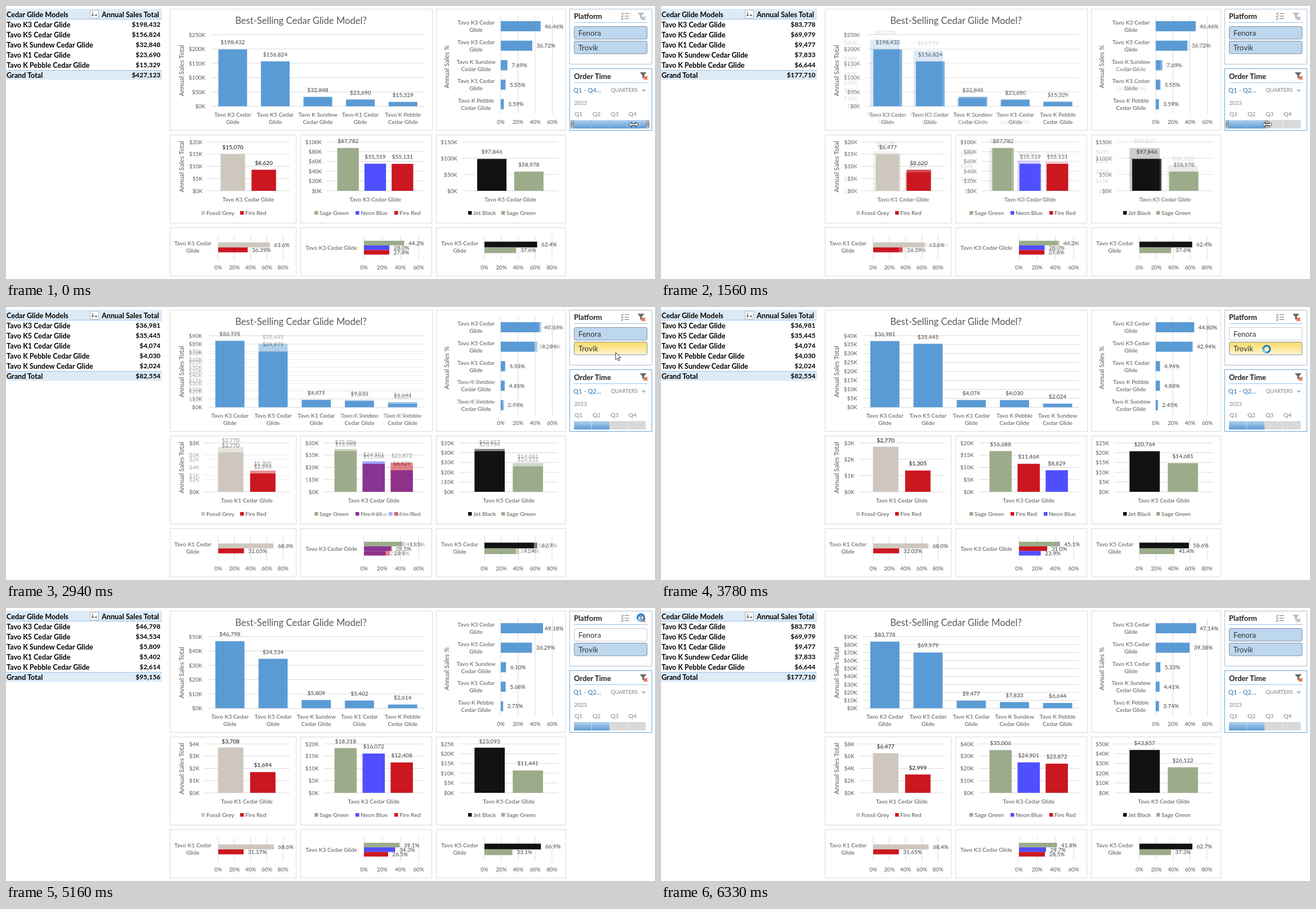
Recreate the animation shown at these times as an HTML page. Size 1153 px wide and 486 px high, loop 6.48 s.

```html
<!DOCTYPE html>
<html lang="en">
<head>
<meta charset="utf-8">
<title>Sales dashboard</title>
<style>
  html, body { margin: 0; width: 100%; height: 100%; overflow: hidden; background: #fff; }
  svg { display: block; width: 1153px; height: 486px; font-family: Lato, Carlito, sans-serif; }
</style>
</head>
<body>
<svg id="stage" viewBox="0 0 1153 486" xmlns="http://www.w3.org/2000/svg">
  <defs>
    <linearGradient id="hover" x2="0" y2="1">
      <stop offset="0" stop-color="#fbdc69"/><stop offset=".45" stop-color="#fce68f"/><stop offset="1" stop-color="#fef6d8"/>
    </linearGradient>
    <linearGradient id="span" x2="0" y2="1">
      <stop offset="0" stop-color="#b3d3ef"/><stop offset="1" stop-color="#5b9bd5"/>
    </linearGradient>
  </defs>
</svg>
<script>
const LOOP = 6480, FRAME = 30, FADE = 190;
const BLUE = '#5b9bd5', GRID = '#d9d9d9', INK = '#595959', LABEL = '#404040';
const stage = document.getElementById('stage');

// ---- drawing helpers
function add(parent, tag, attrs, content) {
  const node = document.createElementNS('http://www.w3.org/2000/svg', tag);
  for (const key in attrs) node.setAttribute(key, attrs[key]);
  if (content !== undefined) node.textContent = content;
  parent.appendChild(node);
  return node;
}
const group = parent => add(parent, 'g', {});
const box = (g, x, y, width, height, fill, more) => add(g, 'rect', { x, y, width, height, fill, ...more });
const line = (g, x1, y1, x2, y2, stroke = GRID, w = 1) =>
  add(g, 'line', { x1, y1, x2, y2, stroke, 'stroke-width': w });
const path = (g, d, fill, stroke = 'none', w = 1) =>
  add(g, 'path', { d, fill, stroke, 'stroke-width': w });
// y is the middle of the capitals
function text(g, str, x, y, size, anchor = 'start', fill = INK, weight = 400) {
  return add(g, 'text', {
    x, y: y + size * 0.36, 'font-size': size, 'text-anchor': anchor, fill, 'font-weight': weight
  }, str);
}
const panel = (g, x, y, right, bottom, stroke = GRID) =>
  box(g, x + .5, y + .5, right - x - 1, bottom - y - 1, '#fff', { stroke });
const show = (node, on) => { node.style.display = on ? '' : 'none'; };
const money = v => '$' + Math.round(v).toLocaleString('en-US');

// ---- data
const LINE = 'Cedar Glide';
const models = { 3: 'Tavo K3', 5: 'Tavo K5', 1: 'Tavo K1', S: 'Tavo K Sundew', P: 'Tavo K Pebble' };
const fullName = key => models[key] + ' ' + LINE;
const wrapped = key => models[key].length > 7 ? [models[key], LINE] : [models[key] + ' Cedar', 'Glide'];

const paint = {
  F: { name: 'Fossil Grey', fill: '#cec7be', step: 69 },
  R: { name: 'Fire Red', fill: '#cb1720', step: 59 },
  G: { name: 'Sage Green', fill: '#9cac8b', step: 73 },
  B: { name: 'Neon Blue', fill: '#4f4fff', step: 69 },
  K: { name: 'Jet Black', fill: '#111214', step: 59 }
};

// axis is [maximum, step] in thousands
const year = {
  order: '35S1P', vals: [198432, 156824, 32848, 23690, 15329], total: 427123, axis: [250, 50],
  k1: { axis: [20, 5], keys: 'FR', vals: [15070, 8620] },
  k3: { axis: [100, 20], keys: 'GBR', vals: [87782, 55519, 55131] },
  k5: { axis: [150, 50], keys: 'KG', vals: [97846, 58978] }
};
const half = {
  order: '351SP', vals: [83778, 69979, 9477, 7833, 6644], total: 177710, axis: [90, 10],
  k1: { axis: [8, 2], keys: 'FR', vals: [6477, 2999] },
  k3: { axis: [40, 10], keys: 'GBR', vals: [35006, 24901, 23872] },
  k5: { axis: [50, 10], keys: 'KG', vals: [43857, 26122] }
};
const shopA = {
  order: '351PS', vals: [36981, 35445, 4074.3, 4030, 2024], total: 82554, axis: [40, 5],
  k1: { axis: [3, 1], keys: 'FR', vals: [2770, 1305.3] },
  k3: { axis: [20, 5], keys: 'GRB', vals: [16688, 11464, 8829] },
  k5: { axis: [25, 5], keys: 'KG', vals: [20764, 14681] }
};
const shopB = {
  order: '35S1P', vals: [46798, 34534, 5809, 5402, 2614], total: 95156, axis: [50, 10],
  k1: { axis: [4, 1], keys: 'FR', vals: [3707.6, 1694.45] },
  k3: { axis: [20, 5], keys: 'GBR', vals: [18318, 16072, 12408] },
  k5: { axis: [25, 5], keys: 'KG', vals: [23093, 11441] }
};
// until: when the table moves on; fade: when the charts start to follow
const views = [
  { data: year, until: 1290, fade: 1520 },
  { data: half, until: 2640, fade: 2850 },
  { data: shopA, until: 3900, fade: 4050 },
  { data: shopB, until: 5700, fade: 5840 },
  { data: half, until: LOOP, fade: LOOP }
];

// ---- charts
function columns(g, o) {
  const [max, step] = o.axis;
  const left = o.left - 5.6 * (3 - String(max).length);
  const width = o.right - left, mid = (left + o.right) / 2, rise = o.base - o.top;
  for (let v = 0; v <= max; v += step) {
    const y = o.base - rise * v / max;
    line(g, left, y, o.right, y);
    text(g, `$${v}K`, left - o.gap, y, 9.8, 'end');
  }
  return o.vals.map((v, i) => {
    const x = mid + (i - (o.vals.length - 1) / 2) * width * o.pitch;
    const y = o.base - rise * v / max / 1000;
    box(g, x - width * o.bar / 2, y, width * o.bar, o.base - y, o.fill(i));
    if (o.names) o.names[i].forEach((s, k) => text(g, s, x, 193 + 13 * k, 10.3, 'middle'));
    const labelY = Math.max(y - 12.5, o.top - 5);
    return { mid, label: text(g, money(v), x, labelY, 10.1, 'middle', o.ink || LABEL) };
  });
}

function shares(g, o) {
  for (let v = 0; v <= o.max; v += 20) {
    const x = o.x + v * o.unit;
    line(g, x, o.top, x, o.bottom);
    text(g, v + '%', x, o.tickY, 9.8, 'middle');
  }
  o.vals.forEach((v, i) => {
    const y = o.rowY(i), end = o.x + v * o.unit;
    box(g, o.x, y - o.thick / 2, v * o.unit, o.thick, o.fill(i));
    text(g, v.toFixed(o.digits(i)) + '%', Math.min(end + 7.5, o.limit), y, 10, 'start', LABEL);
  });
}

function vertical(g, str, x, y) {
  text(g, str, 0, 0, 11.6, 'middle').setAttribute('transform', `translate(${x} ${y}) rotate(-90)`);
}

const clusters = [
  { id: 'k1', key: '1', x: 291, end: 516, left: 362.6, right: 504, gap: 8, pitch: .374, bar: .296, legend: 347,
    ink: '#111', zero: 377, unit: 1.44, max: 80, first: 425.3, row: 8.8, cat: 332 },
  { id: 'k3', key: '3', x: 523, end: 757, left: 570, right: 742, gap: 9, pitch: .281, bar: .223, legend: 548,
    zero: 636, unit: 1.617, max: 60, first: 422, row: 8.2, cat: 578 },
  { id: 'k5', key: '5', x: 764, end: 995, left: 811, right: 981, gap: 9.5, pitch: .387, bar: .306, legend: 821,
    zero: 850, unit: 1.5, max: 80, first: 424.6, row: 10.2, cat: 806 }
];

function charts(data) {
  const g = group(stage);
  let lead;
  panel(g, 291, 5, 758, 222);
  text(g, `Best-Selling ${LINE} Model?`, 524, 26, 16.6, 'middle');
  vertical(g, 'Annual Sales Total', 312, 115);
  columns(g, {
    axis: data.axis, vals: data.vals, left: 365, right: 743, top: 51, base: 178.5, gap: 11,
    pitch: .2, bar: .135, fill: () => BLUE, names: [...data.order].map(wrapped)
  });

  panel(g, 764, 5, 995, 222);
  vertical(g, 'Annual Sales %', 783, 108);
  shares(g, {
    x: 879, unit: 1.525, max: 60, top: 18, bottom: 192, tickY: 206, thick: 18, limit: 957,
    vals: data.vals.map(v => 100 * v / data.total), rowY: i => 36 + 34.7 * i, digits: () => 2, fill: () => BLUE
  });
  [...data.order].forEach((key, i) => wrapped(key).forEach((s, k) =>
    text(g, s, 835, 29.5 + 34.7 * i + 13 * k, 10.3, 'middle')));

  for (const c of clusters) {
    const { axis, keys, vals } = data[c.id];
    const fill = i => paint[keys[i]].fill;
    panel(g, c.x, 229, c.end, 387);
    const bars = columns(g, { ...c, axis, vals, fill, top: 242, base: 329 });
    text(g, fullName(c.key), bars[0].mid, 344, 10.3, 'middle');
    if (c.id === 'k1') {
      vertical(g, 'Annual Sales Total', 312, 286);
      lead = bars[0].label;
    }
    let x = c.legend;
    for (const key of keys) {
      box(g, x, 365, 6.5, 6.5, paint[key].fill);
      text(g, paint[key].name, x + 9, 368.5, 10.4);
      x += paint[key].step;
    }

    panel(g, c.x, 394, c.end, 481);
    const sum = vals.reduce((a, b) => a + b);
    shares(g, {
      x: c.zero, unit: c.unit, max: c.max, top: 408, bottom: 451, tickY: 465, thick: c.row, limit: c.end,
      vals: vals.map(v => 100 * v / sum), rowY: i => c.first + c.row * i,
      digits: i => c.id === 'k1' && i ? 2 : 1, fill
    });
    if (c.id === 'k3') text(g, fullName(c.key), c.cat, 430, 10.3, 'middle');
    else wrapped(c.key).forEach((s, k) => text(g, s, c.cat, 422 + 13.5 * k, 10.3, 'middle'));
  }
  return { g, lead };
}

function table(data) {
  const g = group(stage);
  const row = (name, value, i) => {
    text(g, name, 1, 15 + 18 * i, 12.6, 'start', '#000', 700);
    text(g, value, 274.5, 15 + 18 * i, 11.9, 'end', '#000', 700);
  };
  box(g, 0, 5, 277, 18.5, '#ddebf7');
  box(g, 0, 114, 277, 17.5, '#ddebf7');
  line(g, 0, 23.5, 277, 23.5, '#9bc2e6');
  line(g, 0, 114.5, 277, 114.5, '#9bc2e6');
  text(g, LINE + ' Models', 1, 15, 12.6, 'start', '#000', 700);
  text(g, 'Annual Sales Total', 272, 15, 12.7, 'end', '#000', 700);
  box(g, 149.5, 7.5, 15, 14, '#fdfdfd', { stroke: '#b5b5b5' });
  path(g, 'M154 10.5v7M152 15.5l2 2.2 2-2.2', 'none', '#44546a', 1.1);
  path(g, 'M157.5 15.5h5l-2.5 3z', '#555');
  data.vals.forEach((v, i) => row(fullName(data.order[i]), money(v), i + 1));
  row('Grand Total', money(data.total), 6);
  return g;
}

// the last view lies at the bottom, so each one fades to the next
for (let i = views.length - 1; i >= 0; i--) Object.assign(views[i], charts(views[i].data));
for (const v of views) v.table = table(v.data);

// ---- slicer
function filterIcon(x, y, on) {
  const g = group(stage);
  path(g, `M${x} ${y}h12l-4.5 5.5v6l-3-2v-4z`, on ? '#6a6a6a' : '#bdbdbd');
  path(g, `M${x + 7.5} ${y + 7}l6 6m0-6l-6 6`, 'none', on ? '#e2512c' : '#b0b0b0', 1.8);
  return g;
}
panel(stage, 1001, 5, 1148, 104, '#a9c0d6');
text(stage, 'Platform', 1009, 18.5, 13, 'start', '#222', 700);
for (let i = 0; i < 3; i++) {
  path(stage, `M1093 ${13.5 + 4.5 * i}l1.5 1.5 2.5-3M1099 ${13.5 + 4.5 * i}h8`, 'none', '#777', 1.1);
}
line(stage, 1009, 29.5, 1140, 29.5, '#9dc3e6');
const iconOff = filterIcon(1122, 12, false), iconOn = filterIcon(1122, 12, true);
const buttons = ['Fenora', 'Trovik'].map((name, i) => {
  const y = 36.5 + 26 * i;
  const face = box(stage, 1009.5, y, 129.5, 22.5, '#bdd7ee', { rx: 2.5 });
  text(stage, name, 1017, y + 11.3, 13.2, 'start', '#333');
  return { face, y };
});

// ---- timeline
panel(stage, 1001, 111, 1148, 222, '#6aa5d8');
text(stage, 'Order Time', 1009, 125, 13.1, 'start', '#222', 700);
filterIcon(1126, 118, true);
line(stage, 1009, 136.5, 1140, 136.5, '#9dc3e6');
const rangeLabel = text(stage, '', 1008, 150, 11.3, 'start', '#2e75b6');
text(stage, 'QUARTERS', 1074.5, 150, 9.3, 'start', '#808080');
path(stage, 'M1129 148.5h8l-4 4.5z', '#b5b5b5');
text(stage, '2023', 1009.5, 173, 9.6, 'start', '#808080');
const cells = [1009, 1041, 1073, 1105].map((x, i) => {
  text(stage, 'Q' + (i + 1), x + 1, 192, 10.4, 'start', '#808080');
  return box(stage, x, 203, 31.5, 15, GRID);
});
const grips = group(stage);
const gripBand = box(grips, 1005, 203, 0, 15, 'url(#span)');
const gripLines = [1040.5, 1072.5, 1104.5].map(x => line(grips, x, 203, x, 218, '#8dbbe5'));
function grip() {
  const g = group(grips);
  box(g, 0.5, 203.5, 5, 14, '#c4c4c4', { stroke: '#858585', rx: 2 });
  line(g, 2, 207, 2, 214, '#777');
  line(g, 4, 207, 4, 214, '#777');
  return g;
}
grip().setAttribute('transform', 'translate(1003 0)');
const endGrip = grip();

// ---- pointer
const pointer = group(stage);
const arrow = path(pointer, 'M0 0v13l3-2.8 2.1 4.6 2.1-1-2.1-4.4h4.2z', '#fff', '#333');
const resize = path(pointer, 'M-8.5 0l4.5-4.5v3h8v-3l4.5 4.5-4.5 4.5v-3h-8v3z', '#fff', '#222');
const busy = group(pointer);
add(busy, 'circle', { r: 6, fill: '#ffffff55', stroke: '#1f7fd0', 'stroke-width': 3.2 });
const glint = add(busy, 'circle', {
  r: 6, fill: 'none', stroke: '#6fc3f5', 'stroke-width': 3.2, 'stroke-dasharray': '10 27.7'
});

const moves = [
  [0, 1115, 211], [30, 1115, 211], [660, 1092, 211], [930, 1077, 211], [1710, 1077, 211], [2130, 1087, 58],
  [2430, 1087, 58], [2790, 1083, 81], [3090, 1083, 81], [3390, 1076, 75], [4530, 1076, 75],
  [5070, 1128, 17], [LOOP, 1128, 17]
];
const clamp = v => Math.min(1, Math.max(0, v));
function place(t) {
  const i = moves.findIndex(m => m[0] > t);
  const [t0, x0, y0] = moves[i - 1], [t1, x1, y1] = moves[i];
  const p = (t - t0) / (t1 - t0), e = p * p * (3 - 2 * p);
  return [x0 + (x1 - x0) * e, y0 + (y1 - y0) * e];
}
const within = (t, a, b) => t >= a && t < b;

function render(t) {
  const now = views.findIndex(v => t < v.until);
  let covered = false;
  views.forEach((v, i) => {
    const alpha = 1 - clamp((t - v.fade) / FADE);
    show(v.table, i === now);
    show(v.g, alpha > 0 && !covered);
    v.g.setAttribute('opacity', alpha);
    if (alpha === 1) covered = true;
    // this one label follows the table at once
    v.lead.textContent = money(views[Math.max(i, now)].data.k1.vals[0]);
  });

  const [x, y] = place(t);
  const filtered = within(t, 2460, 5700);
  const picked = [!within(t, 3600, 5700), !within(t, 2460, 3600)];
  show(iconOn, filtered);
  show(iconOff, !filtered);
  buttons.forEach((b, i) => {
    const over = y > b.y && y < b.y + 25;
    b.face.setAttribute('fill', over ? 'url(#hover)' : picked[i] ? '#bdd7ee' : '#fff');
    b.face.setAttribute('stroke', over || picked[i] ? '#7f8fa0' : '#c8c8c8');
  });

  const last = t < 330 ? 4 : t < 690 ? 3 : 2;
  rangeLabel.textContent = `Q1 - Q${last}...`;
  cells.forEach((c, i) => c.setAttribute('fill', i < last ? 'url(#span)' : GRID));
  show(grips, y > 112);
  gripBand.setAttribute('width', 4 + 32 * last);
  gripLines.forEach((l, i) => show(l, i < last - 1));
  endGrip.setAttribute('transform', `translate(${1009 + 32 * last} 0)`);

  const waiting = within(t, 3600, 4260) || within(t, 5100, 5760);
  const dragging = t < 1740;
  pointer.setAttribute('transform', `translate(${x} ${y})`);
  show(pointer, t < 6300);
  show(resize, dragging);
  show(busy, waiting);
  show(arrow, !dragging && !waiting);
  glint.setAttribute('transform', `rotate(${t * .5 % 360})`);
}

const start = performance.now();
function tick() {
  const t = (performance.now() - start) % LOOP;
  render(Math.floor(t / FRAME) * FRAME);
  requestAnimationFrame(tick);
}
tick();
</script>
</body>
</html>
```
